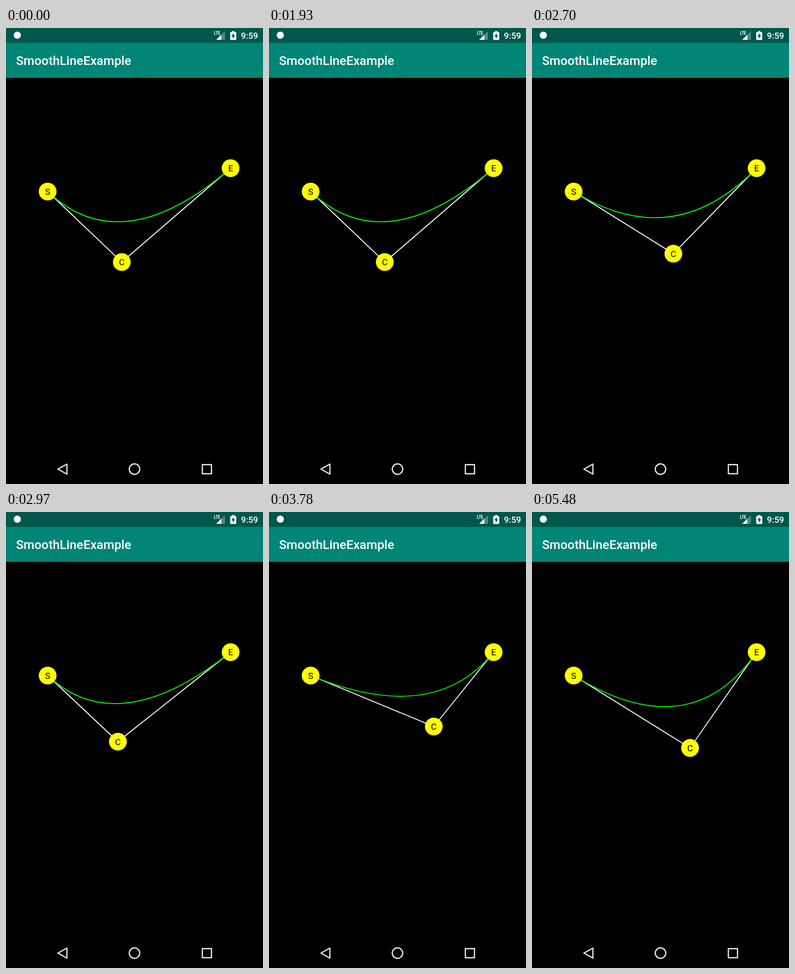
An HTML page that plays this animation: 500 px wide and 888 px high, repeating every 5.52 s.

```html
<!DOCTYPE html>
<html lang="en">
<head>
<meta charset="utf-8">
<title>Quadratic curve</title>
<style>
  html, body { margin: 0; width: 100%; height: 100%; overflow: hidden; background: #000; }
  svg { display: block; width: 100%; height: 100%; }
  text { font-family: Roboto, "Noto Sans", sans-serif; }
  .node circle { fill: #ff0; }
  .node text { font-size: 17px; text-anchor: middle; }
</style>
</head>
<body>
<svg viewBox="0 0 500 888">
  <rect width="500" height="888"/>
  <rect width="500" height="97" fill="#008577"/>
  <rect width="500" height="29" fill="#00574b"/>

  <!-- status bar -->
  <g fill="#fff">
    <circle cx="22" cy="14" r="7"/>
    <path d="M405.6 6v6.6h2.6M408.4 6.6h4M410.4 6.6v6.6M416.2 6.6h-2.6v6h2.6M413.6 9.6h2.3" fill="none" stroke="#fff" stroke-width="1.2"/>
    <path d="M409 23L426 6V23Z" opacity=".3"/>
    <path d="M409 23L419 13V23Z"/>
    <path d="M439.5 8V6h5v2h2.3q1.2 0 1.2 1.2v12.9q0 1.2-1.2 1.2h-9.4q-1.2 0-1.2-1.2V9.2q0-1.2 1.2-1.2Z"/>
    <path d="M443 9.8L438.4 16.2H441.2V21L445.9 14.3H443Z" fill="#00574b"/>
    <text x="490.5" y="21" font-size="17" font-weight="500" text-anchor="end">9:59</text>
    <text x="19.4" y="72.3" font-size="24.3" font-weight="500">SmoothLineExample</text>
  </g>

  <!-- navigation bar -->
  <g fill="none" stroke="#e8e8e4" stroke-width="2.4" stroke-linejoin="round">
    <path d="M101 859L118.5 849.3V868.7Z"/>
    <circle cx="250" cy="859" r="10.2"/>
    <rect x="382" y="850.2" width="17.8" height="17.8"/>
  </g>

  <g fill="none" stroke-width="1.8">
    <path id="guide" stroke="#fff"/>
    <path id="curve" stroke="#0f0"/>
  </g>
  <g class="node" id="start"><circle r="17.3"/><text y="6.3">S</text></g>
  <g class="node" id="control"><circle r="17.3"/><text y="6.3">C</text></g>
  <g class="node" id="end"><circle r="17.3"/><text y="6.3">E</text></g>
</svg>
<script>
  const LOOP = 5520;
  const START = [81, 318.5];
  const END = [437, 273];

  // Drag of the control point: time, x, y
  const DRAG = [
    [1930, 225.3, 455.8],
    [2430, 332.7, 431.5],
    [2970, 217.7, 447.2],
    [3780, 320.5, 417.7],
    [4310, 354.8, 438.8],
    [4690, 307.5, 459.4]
  ];
  const LAST = DRAG.length - 1;

  const byId = id => document.getElementById(id);
  const place = (id, [x, y]) => byId(id).setAttribute('transform', `translate(${x} ${y})`);

  function slope(i, axis) {
    if (i === 0 || i === LAST) return 0;
    const a = DRAG[i - 1], b = DRAG[i + 1];
    return (b[axis] - a[axis]) / (b[0] - a[0]);
  }

  // Cubic Hermite interpolation, at rest before and after the drag
  function controlAt(time) {
    if (time <= DRAG[0][0]) return DRAG[0].slice(1);
    if (time >= DRAG[LAST][0]) return DRAG[LAST].slice(1);
    const i = DRAG.findIndex(key => key[0] > time) - 1;
    const a = DRAG[i], b = DRAG[i + 1];
    const span = b[0] - a[0];
    const u = (time - a[0]) / span;
    const blend = u * u * (3 - 2 * u);
    return [1, 2].map(axis =>
      a[axis] + (b[axis] - a[axis]) * blend
      + span * u * (1 - u) * ((1 - u) * slope(i, axis) - u * slope(i + 1, axis)));
  }

  function draw(time) {
    const control = controlAt(time);
    place('control', control);
    byId('guide').setAttribute('d', `M${START}L${control}L${END}`);
    byId('curve').setAttribute('d', `M${START}Q${control} ${END}`);
  }

  place('start', START);
  place('end', END);
  draw(0);

  const origin = performance.now();
  function tick() {
    draw((performance.now() - origin) % LOOP);
    requestAnimationFrame(tick);
  }
  requestAnimationFrame(tick);
</script>
</body>
</html>
```
